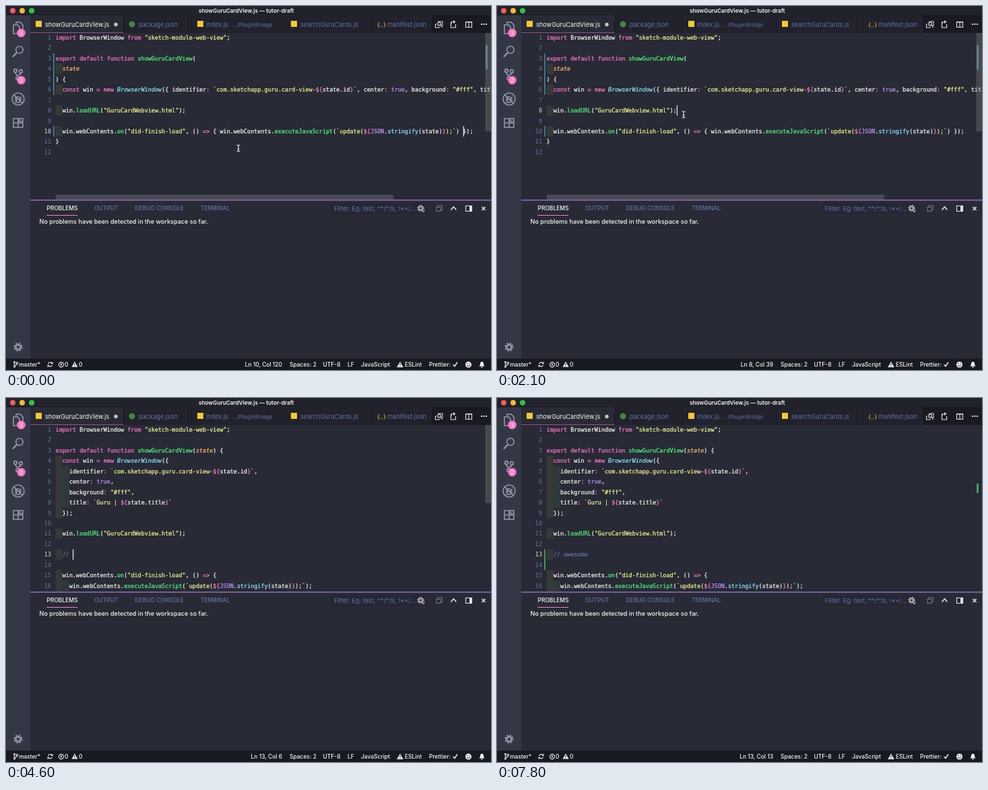
An HTML page that plays this animation: 720x540 px, repeating every 7.9 s.

```html
<!DOCTYPE html>
<html lang="en">
<head>
<meta charset="utf-8">
<title>Code editor</title>
<style>
html, body { margin: 0; width: 100%; height: 100%; overflow: hidden; background: #000; }
svg { display: block; width: 720px; height: 540px; }
text { font: 500 8.45px Inter, "Open Sans", sans-serif; white-space: pre; fill: #f8f8f2; }
.title { font-size: 8.2px; font-weight: 600; }
.tab { font-size: 9.2px; font-weight: 400; }
.dim { fill: #6272a4; }
.note { font-size: 9.1px; }
.badge { font-size: 8px; text-anchor: middle; }
.code { font: 8.446px "DejaVu Sans Mono", "Liberation Mono", monospace; stroke-width: .22px; }
.num { text-anchor: end; fill: #6272a4; }
.num.on { fill: #d8d8d8; }
.end { text-anchor: end; }
.w { fill: #f8f8f2; stroke: #f8f8f2; }
.p { fill: #ff79c6; stroke: #ff79c6; }
.b { fill: #ff79c6; font-weight: bold; }
.g { fill: #50fa7b; stroke: #50fa7b; }
.y { fill: #f1fa8c; stroke: #f1fa8c; }
.v { fill: #bd93f9; stroke: #bd93f9; }
.s { fill: #8be9fd; stroke: #8be9fd; }
.c { fill: #8be9fd; stroke: #8be9fd; font-style: italic; }
.o { fill: #ffb86c; stroke: #ffb86c; font-style: italic; }
.m { fill: #6272a4; stroke: #6272a4; }
.icon { fill: none; stroke: #9498a8; stroke-width: 1.6; }
.act { fill: none; stroke: #e4e4e4; stroke-width: 1.1; }
</style>
</head>
<body>
<svg viewBox="0 0 720 540" xmlns="http://www.w3.org/2000/svg">
  <defs><clipPath id="pane"><rect x="36" y="40" width="684" height="248"/></clipPath></defs>
  <rect width="720" height="540" fill="#282a36"/>
  <rect width="720" height="14" fill="#21222c"/>
  <circle cx="10" cy="7" r="4" fill="#fc5b57"/>
  <circle cx="24" cy="7" r="4" fill="#fdbc2e"/>
  <circle cx="38" cy="7" r="4" fill="#29c940"/>
  <text class="title" x="286" y="10">showGuruCardView.js — tutor-draft</text>

  <rect y="14" width="36" height="509" fill="#343746"/>
  <g class="icon">
    <path d="M15 27V24H21L25 28V37H20M11 28H17L20 31V41H11Z"/>
    <circle cx="20" cy="65" r="5.3"/><path d="M16 69L10 75.5" stroke-width="2.4"/>
    <circle cx="14" cy="96" r="2.4"/><circle cx="22" cy="97" r="2.4"/><circle cx="17" cy="107" r="2.2"/>
    <path d="M14 98.5Q14 102 17 102.5V105M22 99.5Q22 102 17 102.5"/>
    <circle cx="18" cy="138" r="9"/><path d="M11.5 131.5L24.5 144.5"/>
    <ellipse cx="18" cy="139" rx="3" ry="4.5"/><path d="M13 135L15 137M12 139H24M13 144L15 142M23 135L21 137" stroke-width="1.2"/>
    <path d="M11 167H18V180H11ZM11 173.5H25V180H18M20 167H25V171.5H20Z"/>
    <circle cx="18" cy="506" r="3.6" stroke-width="2.5"/><circle cx="18" cy="506" r="5.7" stroke-dasharray="2.24 2.24" stroke-width="2"/>
  </g>
  <circle cx="22.5" cy="40" r="6.3" fill="#ff79c6"/>
  <circle cx="22.5" cy="110" r="6.3" fill="#ff79c6"/>
  <text class="badge" x="22.5" y="113">2</text>

  <rect x="36" y="14" width="684" height="26" fill="#21222c"/>
  <rect x="632" y="14" width="88" height="26" fill="#191a21"/>
  <rect x="36" y="14" width="138" height="26" fill="#282a36"/>
  <path d="M36 39.5H174" stroke="#ff79c6" stroke-opacity=".5"/>
  <path d="M174.5 14V40M275.5 14V40M414.5 14V40M543.5 14V40" stroke="#191a21"/>
  <path d="M44 22h9v9h-9ZM284 22h9v9h-9ZM423 22h9v9h-9Z" fill="#f5c92e"/>
  <circle cx="187" cy="27" r="4.5" fill="#43853d"/>
  <text class="tab" x="58" y="30.5">showGuruCardView.js</text>
  <g id="tabs"></g>
  <g class="act">
    <path d="M642 25V23H648V29H646M639 27H637.5V32H643V30.5"/><circle cx="643" cy="26.5" r="2.3"/><path d="M645 28.5L648 32"/>
    <path d="M662 24H660.5V32H667.5V27M661 26Q661 23 666 23.5M664 21.5L666.5 23.5L664 25.5"/>
    <path d="M682.5 23.5H691.5V31.5H682.5ZM687 23V32M682 24H692"/>
  </g>
  <path d="M705 26h2v2h-2zM708.5 26h2v2h-2zM712 26h2v2h-2z" fill="#e4e4e4"/>

  <g id="editor" clip-path="url(#pane)"></g>

  <path d="M36 288H720" stroke="#8c70b8" stroke-width="1.3"/>
  <text x="60.5" y="303">PROBLEMS</text>
  <path d="M60 310.5H106" stroke="#ff79c6"/>
  <text class="dim" x="131" y="303">OUTPUT</text>
  <text class="dim" x="191.5" y="303">DEBUG CONSOLE</text>
  <text id="terminal" x="289" y="303">TERMINAL</text>
  <rect x="483.5" y="293.5" width="141" height="13.5" fill="#262835" stroke="#22232d"/>
  <text class="tab dim" x="487" y="303.5">Filter. Eg: text, **/*.ts, !**/...</text>
  <g class="act">
    <circle cx="615.5" cy="300" r="2.6" stroke="#bbb" stroke-width="1.8"/><circle cx="615.5" cy="300" r="4.4" stroke="#bbb" stroke-dasharray="1.728 1.728" stroke-width="1.6"/>
    <path d="M617 303.5H622M618 305.5H621" stroke="#bbb"/>
    <path d="M639 298.5H645V304.5H639ZM641 298V296H647.5V302.5H645" stroke="#737580"/>
    <path d="M660.5 302.5L664.5 298L668.5 302.5" stroke-width="1.5"/>
    <path d="M682.5 296.5H691.5V304.5H682.5Z"/><path d="M689.5 296V305" stroke-width="3"/>
    <path d="M706.5 298L711.5 303M711.5 298L706.5 303" stroke-width="1.7"/>
  </g>
  <text class="note" x="49.5" y="323">No problems have been detected in the workspace so far.</text>

  <rect y="523" width="720" height="17" fill="#191a21"/>
  <g class="act">
    <circle cx="12.5" cy="528.5" r="1.2"/><circle cx="12.5" cy="535" r="1.2"/><circle cx="16.5" cy="529.5" r="1.2"/>
    <path d="M12.5 530V534M16.5 531Q16 533 12.5 533"/>
    <path d="M62.5 531A3.2 3.2 0 0 1 68.5 530.5M68.5 532.5A3.2 3.2 0 0 1 62.5 533M67 530.5H69V528M64 533H62V535.5"/>
    <circle cx="82" cy="532" r="3.6"/><path d="M80.5 530.5L83.5 533.5M83.5 530.5L80.5 533.5"/>
    <path d="M663.5 532L666 534.5L670 528.5" stroke-width="1.6"/>
  </g>
  <path d="M102 527.5L106.5 535.5H97.5ZM585 527.5L589.8 536H580.2Z" fill="#f0f0f0"/>
  <path d="M102 530V533M102 533.8V534.7M585 530V533.3M585 534V535" stroke="#191a21"/>
  <circle cx="686.5" cy="532" r="4.5" fill="#f0f0f0"/>
  <path d="M684.8 530V531.3M688.2 530V531.3M684 533Q686.5 536 689 533" fill="none" stroke="#191a21"/>
  <path d="M702.5 534.5Q704 533 704 530.5Q704 528 706.5 527.5Q709 528 709 530.5Q709 533 710.5 534.5ZM705.3 535.3H707.7V536.5H705.3Z" fill="#f0f0f0"/>
  <g id="status"></g>
  <g id="dynamic"></g>
</svg>
<script>
(() => {
const LOOP = 7900, STEP = 100;
const X0 = 73.6, CHAR = 5.085, ROW = 15.44;
const FORMAT = 2200, ENTER = 3900, ENTER_AGAIN = 4100, TYPE = 4400, DIFF = 5700;
const CLICK = 1100, REAPPEAR = 6300;
const el = id => document.getElementById(id);
const rect = (x, y, w, h, fill) => `<rect x="${x}" y="${y}" width="${w}" height="${h}" fill="${fill}"/>`;
const label = (x, y, str, cls = '') => `<text x="${x}" y="${y}" class="${cls}">${str}</text>`;
const rowTop = n => 39.2 + (n - 1) * ROW;

// In code lines, "§" plus a letter switches the token class.
const importLine = '§pimport§w BrowserWindow §pfrom§w §y"sketch-module-web-view"§w;';
const header = '§pexport default function§w §gshowGuruCardView§w(';
const newWindow = '  §pconst§w win §p=§w §bnew§w §cBrowserWindow§w({';
const identifier = 'identifier§p:§w §y`com.sketchapp.guru.card-view-§p${§wstate.id§p}§y`§w,';
const center = 'center§p:§w §vtrue§w,';
const background = 'background§p:§w §y"#fff"§w,';
const loadUrl = '  win.§gloadURL§w(§y"GuruCardWebview.html"§w);';
const onLoad = '  win.webContents.§gon§w(§y"did-finish-load"§w, () §p=>§w {';
const execute = 'win.webContents.§gexecuteJavaScript§w(§y`update(§p${§vJSON§w.§sstringify§w(state)§p}§y);`§w)';

const messy = [
  importLine, '', header, '  §ostate', ') {',
  `${newWindow} ${identifier} ${center} ${background} title§p:§w`,
  '', loadUrl, '', `${onLoad} ${execute} });`, '}', ''
];
const tidyHead = [
  importLine, '', header + '§ostate§w) {', newWindow, '    ' + identifier,
  '    ' + center, '    ' + background,
  '    title§p:§w §y`Guru | §p${§wstate.title§p}§y`', '  });', '', loadUrl
];
const tidyTail = ['', onLoad, `    ${execute};`, '  });', '}', ''];

function documentAt(t) {
  if (t < FORMAT) {
    return t < CLICK ? { lines: messy, line: 10, col: 120, since: 0 }
                     : { lines: messy, line: 8, col: 39, since: CLICK };
  }
  if (t < ENTER) return { lines: [...tidyHead, ...tidyTail], line: 11, col: 39, since: FORMAT };
  if (t < ENTER_AGAIN) return { lines: [...tidyHead, '  ', ...tidyTail], line: 12, col: 3, since: ENTER };
  const comment = '// awesome';
  const typed = Math.max(0, Math.min(comment.length, Math.floor((t - TYPE) / 100) + 1));
  return {
    lines: [...tidyHead, '', '  §m' + comment.slice(0, typed), ...tidyTail],
    line: 13, col: 3 + typed,
    since: typed ? TYPE + (typed - 1) * 100 : ENTER_AGAIN
  };
}

function codeLine(source, i, active) {
  const n = i + 1, y = (50 + i * ROW).toFixed(2);
  const indent = source.match(/^ */)[0].length / 2;
  const tints = ['rgba(255,255,64,.07)', 'rgba(127,255,127,.07)'];
  let out = '';
  for (let k = 0; k < indent; k++) out += rect(X0 + k * 2 * CHAR, rowTop(n), 2 * CHAR, ROW, tints[k]);
  const spans = ('§w' + source).split('§').slice(1)
    .map(s => `<tspan class="${s[0]}">${s.slice(1)}</tspan>`).join('');
  return out + label(67, y, n, 'code num' + (active ? ' on' : '')) + label(X0, y, spans, 'code');
}

function scrollbars(t) {
  let out = '';
  const height = t < FORMAT ? 146 : t < ENTER ? 123 : t < ENTER_AGAIN ? 119 : 116;
  const fade = Math.max(0, Math.min(1, (7400 - t) / 400));
  if (t < FORMAT) out += rect(74, 280, 501, 7.5, '#484a54') + rect(712, 58, 3, 36, '#4f86a0');
  if (t >= DIFF) out += rect(712, 127, 3, 14, '#3fa45a');
  return out + `<g opacity="${fade}">${rect(711.5, 40, 8.5, height, 'rgba(121,121,121,.4)')}</g>`;
}

function editor(t, doc) {
  let out = doc.lines.map((s, i) => codeLine(s, i, i + 1 === doc.line)).join('');
  const mark = (from, count, fill) => rect(70, rowTop(from), 1.8, ROW * count, fill);
  if (t < FORMAT) out += mark(3, 4, '#397f97') + mark(10, 1, '#397f97');
  if (t >= DIFF) out += mark(13, 2, '#3fa45a');
  if ((t - doc.since) % 1000 < 500) {
    out += rect(X0 + (doc.col - 1) * CHAR, rowTop(doc.line), 1.2, ROW, '#f0f0ea');
  }
  return out + scrollbars(t);
}

function pointerAt(t) {
  if (t >= ENTER && t < REAPPEAR) return null;
  const path = [[0, 345, 211], [500, 345, 211], [1000, 277, 161], [REAPPEAR, 277, 161],
    [6600, 309, 301], [6700, 305, 362], [7000, 300, 545]];
  const i = path.findIndex(p => p[0] > t);
  if (i < 0) return null;
  const [a, b] = [path[i - 1], path[i]];
  const u = (t - a[0]) / (b[0] - a[0]), e = u * u * (3 - 2 * u);
  return [a[1] + (b[1] - a[1]) * e, a[2] + (b[2] - a[2]) * e];
}

function pointer(t) {
  const p = pointerAt(t);
  if (!p) return '';
  const shape = p[1] < 288
    ? '<path d="M-2.5 -5Q0 -5 0 -3Q0 -5 2.5 -5M0 -4V4M-2.5 5Q0 5 0 3Q0 5 2.5 5M-1.5 1H1.5" fill="none" stroke="#f4f4f4"/>'
    : '<path d="M0 0V10.5L2.4 8.3L4 12L5.7 11.2L4.1 7.7H7.3Z" fill="#111" stroke="#f4f4f4" stroke-width=".9"/>';
  return `<g transform="translate(${p})">${shape}</g>`;
}

function draw(t) {
  const doc = documentAt(t);
  const dirty = t < FORMAT || t >= ENTER_AGAIN;
  el('editor').innerHTML = editor(t, doc);
  el('dynamic').innerHTML = label(22.5, 43, dirty ? 3 : 2, 'badge') +
    (dirty ? '<circle cx="163" cy="27.5" r="2.7" fill="#c8c8c8"/>'
           : '<path d="M160.5 25L165.5 30M165.5 25L160.5 30" stroke="#f0f0f0" stroke-width="1.5"/>') +
    label(410, 535, `Ln ${doc.line}, Col ${doc.col}`, 'end') + pointer(t);
  el('terminal').setAttribute('class', t >= 6600 && t < 6800 ? '' : 'dim');
}

el('tabs').innerHTML = [[197, 'package.json'], [297, 'index.js'], [437, 'searchGuruCards.js'], [566, 'manifest.json']]
  .map(([x, s]) => label(x, 30.5, s, 'tab dim')).join('') +
  '<text x="335" y="30.5" class="dim" style="font-size:8.2px;opacity:.8">.../PluginBridge</text>' +
  '<text x="551" y="30.5" class="tab" style="fill:#f5c92e">{..}</text>';
el('status').innerHTML = [[19, 'master*'], [87, '0'], [108, '0'], [421, 'Spaces: 2'], [470.5, 'UTF-8'],
  [507, 'LF'], [527, 'JavaScript'], [592, 'ESLint'], [628, 'Prettier:']]
  .map(([x, s]) => label(x, 535, s)).join('');

const start = performance.now();
let shown = -1;
function tick(now) {
  const t = Math.floor(Math.max(0, now - start) % LOOP / STEP) * STEP;
  if (t !== shown) draw(shown = t);
  requestAnimationFrame(tick);
}
draw(0);
requestAnimationFrame(tick);
})();
</script>
</body>
</html>
```
